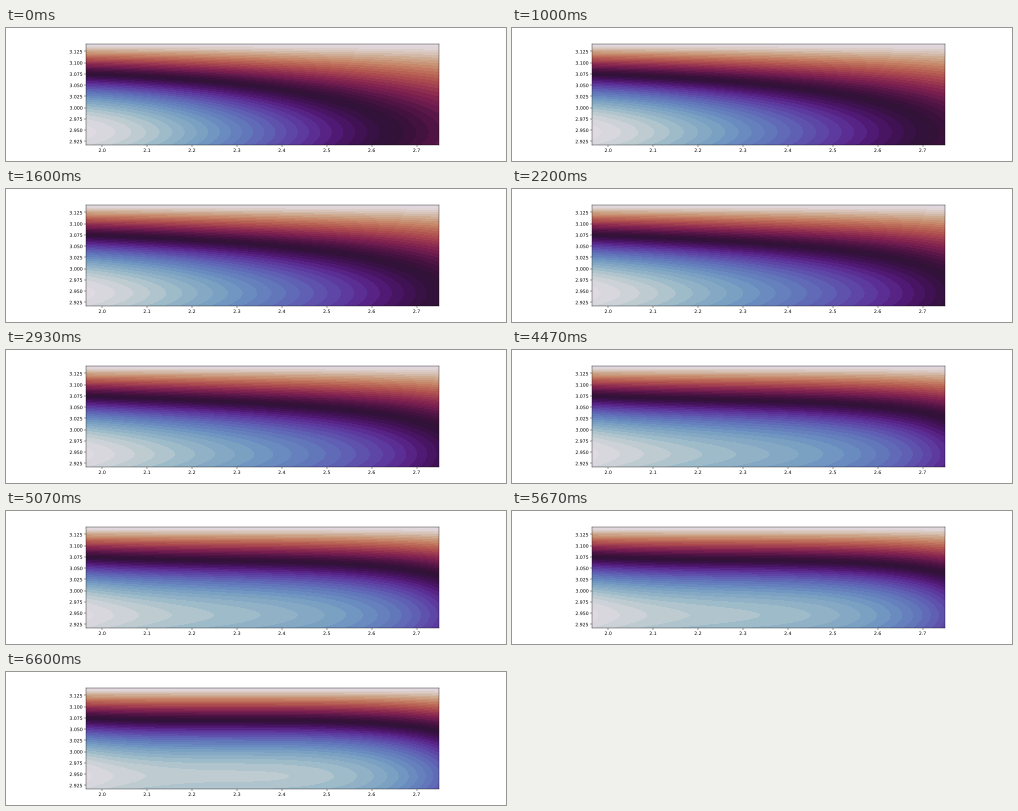
Recreate the animation shown at these times as a matplotlib script. Size 500 px wide and 133 px high, loop 6670 ms.

```python
import numpy as np
import matplotlib.pyplot as plt
from matplotlib.animation import FuncAnimation
from matplotlib.patheffects import Normal
from matplotlib.ticker import MultipleLocator

FRAMES = 100
LOOP_MS = 6670
SCALE = 1 / 3  # a 15 x 4 inch layout shown at a third of its size

plt.rcParams.update({
    "font.family": "DejaVu Sans",
    "font.size": 10 * SCALE,
    "axes.linewidth": 0.8 * SCALE,
})
for axis in ("xtick", "ytick"):
    plt.rcParams.update({
        f"{axis}.major.size": 3.5 * SCALE,
        f"{axis}.major.width": 0.8 * SCALE,
        f"{axis}.major.pad": 3.5 * SCALE,
    })

X0, X1 = 5 * np.pi / 8, 7 * np.pi / 8
Y0, Y1 = 13 * np.pi / 14, np.pi
x = np.linspace(X0, X1, 160)
y = np.linspace(Y0, Y1, 90)
levels = np.linspace(0, 1, 51)

# Amplitude along x at both ends of the loop, as smooth curves
knots = np.linspace(0, 1, 6)
s = (x - X0) / (X1 - X0)


def curve(values):
    return np.polyval(np.polyfit(knots, values, 4), s)


first = curve([0.990, 0.905, 0.790, 0.660, 0.540, 0.425])
last = curve([0.988, 0.938, 0.924, 0.924, 0.870, 0.730])
wave = np.sin(8 * (np.pi - y))


def field(i):
    p = i / (FRAMES - 1)
    amp = first + p * (last - first)
    return np.clip(1 - np.outer(wave, amp), 0, 1)


fig, ax = plt.subplots(figsize=(5, 1.33), dpi=100)
fig.subplots_adjust(left=0.125, right=0.9, bottom=0.11, top=0.88)
ax.set_aspect("equal")
ax.set(xlim=(X0, X1), ylim=(Y0, Y1))
ax.set_position([0.1595, 0.122, 0.7056, 0.758])
ax.xaxis.set_major_locator(MultipleLocator(0.1))
ax.yaxis.set_major_locator(MultipleLocator(0.025))
ax.xaxis.set_major_formatter("{x:.1f}")
ax.yaxis.set_major_formatter("{x:.3f}")

# Outlined glyphs keep the tiny decimal points visible
for label in ax.get_xticklabels() + ax.get_yticklabels():
    label.set_path_effects([Normal()])

contours = None


def update(i):
    global contours
    if contours is not None:
        contours.remove()
    contours = ax.contourf(x, y, field(i), levels=levels, cmap="twilight")
    ax.set(xlim=(X0, X1), ylim=(Y0, Y1))
    return [contours]


anim = FuncAnimation(fig, update, frames=FRAMES, init_func=lambda: update(0),
                     interval=LOOP_MS / FRAMES, repeat=True, repeat_delay=0)
plt.show()
```
